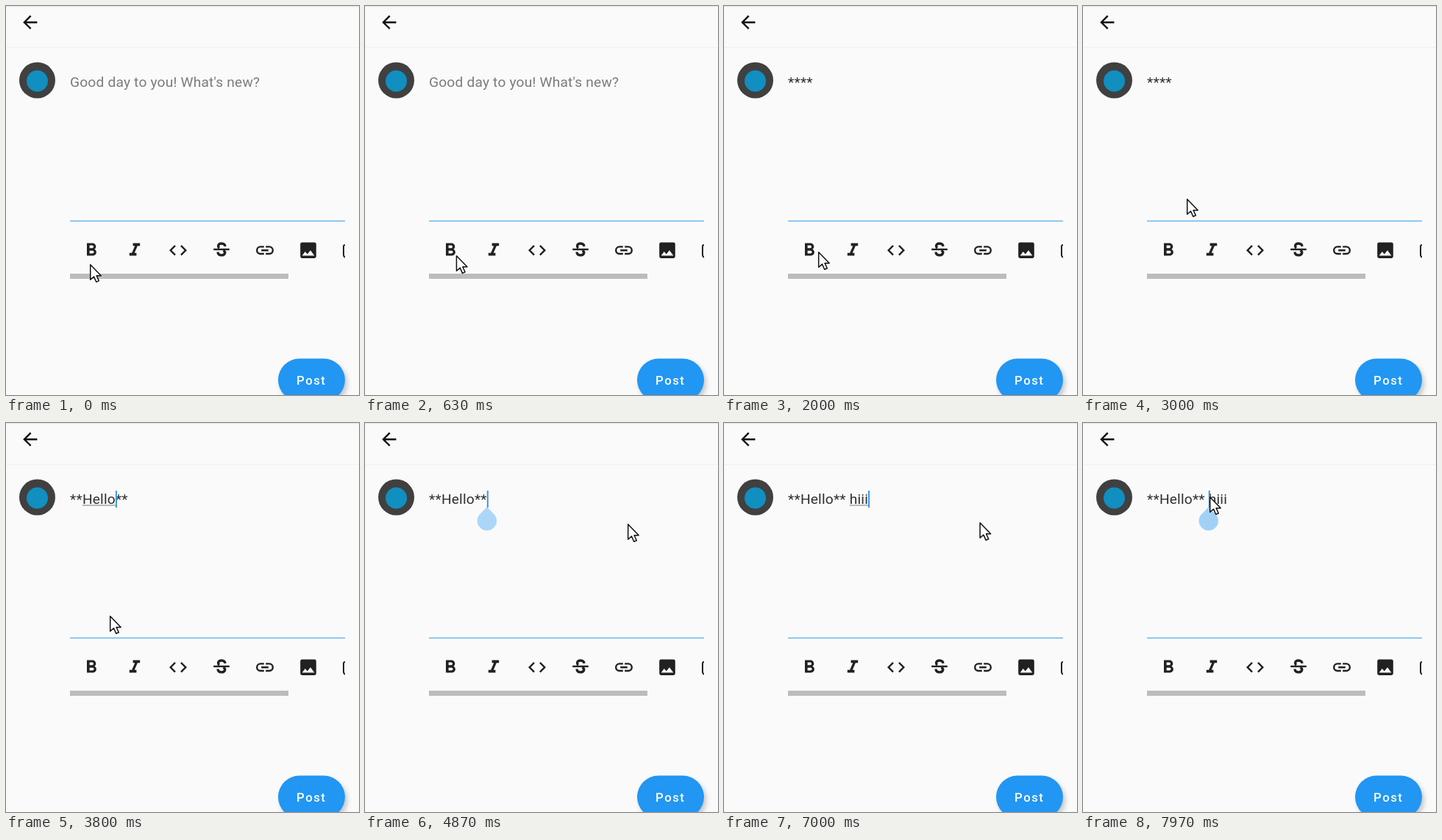
An HTML page that plays this animation: 480x529 px, repeating every 8000 ms.

```html
<!DOCTYPE html>
<html lang="en">
<head>
<meta charset="utf-8">
<title>Post editor</title>
<style>
  html, body { margin: 0; width: 100%; height: 100%; overflow: hidden; background: #fafafa; }
  svg { display: block; width: 100%; height: 100%; }
  text { font-family: Roboto, sans-serif; white-space: pre; }
  .field { font-size: 19.2px; letter-spacing: .18px; }
  .icon { fill: #212121; }
</style>
</head>
<body>
<svg viewBox="0 0 480 529">
  <defs>
    <filter id="blur" x="-30%" y="-30%" width="160%" height="160%"><feGaussianBlur stdDeviation="3"/></filter>
    <clipPath id="bar"><rect x="87" y="280" width="374" height="110"/></clipPath>
  </defs>
  <rect width="480" height="529" fill="#fafafa"/>
  <rect width="480" height="1.2" fill="#e6e6e2"/>
  <rect y="56" width="480" height="1" fill="#f1f1f1"/>

  <path fill="#111" transform="translate(18.4 7.8) scale(1.2)" d="M20 11H7.83l5.59-5.59L12 4l-8 8 8 8 1.41-1.41L7.83 13H20z"/>
  <circle cx="42.5" cy="101" r="24.5" fill="#404040"/>
  <circle cx="42.5" cy="102" r="14.5" fill="#108fc0"/>

  <text id="hint" class="field" x="87" y="109.6" fill="#7c7c7c">Good day to you! What's new?</text>
  <text id="typed" class="field" x="87" y="109.6" fill="#303030"></text>
  <rect id="under" y="111.4" height="1.1" fill="#888"/>
  <rect id="caret" y="92" width="2" height="23" fill="#4097e4"/>
  <path id="handle" d="M0 -18.7L9.33 -9.33A13.2 13.2 0 1 1 -9.33 -9.33Z" fill="#2196f3"/>

  <rect x="87" y="291.7" width="374" height="1.4" fill="#62b3ee"/>
  <g clip-path="url(#bar)">
    <circle id="ripple" cx="116" cy="331.5" fill="#c4c4c4"/>
    <g id="tools"></g>
    <path d="M463 325H461Q459 325 459 327V338Q459 342 463 342" fill="none" stroke="#212121" stroke-width="2"/>
  </g>
  <rect x="87" y="364" width="297" height="7" fill="#bcbcbc"/>

  <rect x="373" y="484" width="91" height="58" rx="29" fill="#777" opacity=".4" filter="url(#blur)"/>
  <rect x="370" y="479.5" width="91" height="58" rx="29" fill="#2196f3"/>
  <text x="395" y="515" font-size="16.8" font-weight="500" letter-spacing="1.5" fill="#fff">Post</text>

  <path id="pointer" d="M0 0V20.5L4.8 16.3L8 23.6L11.6 22L8.4 15H14.5Z" fill="#fff" stroke="#111" stroke-width="1.5" stroke-linejoin="round"/>
</svg>
<script>
const $ = id => document.getElementById(id);
const LOOP = 8000, LEFT = 87, FADE = 200, TAP = 1270;

const tools = [
  '<path d="M15.6 10.79c.97-.67 1.65-1.77 1.65-2.79 0-2.26-1.75-4-4-4H7v14h7.04c2.09 0 3.71-1.7 3.71-3.79 0-1.52-.86-2.82-2.15-3.42zM10 6.5h3a1.5 1.5 0 0 1 0 3h-3zm3.5 9H10v-3h3.5a1.5 1.5 0 0 1 0 3z"/>',
  '<path d="M10 4v3h2.21l-3.42 8H6v3h8v-3h-2.21l3.42-8H18V4z"/>',
  '<path d="M9.4 16.6L4.8 12l4.6-4.6L8 6l-6 6 6 6zM14.6 16.6l4.6-4.6-4.6-4.6L16 6l6 6-6 6z"/>',
  '<path d="M3 10h18v2H3z"/><path d="M16.1 7.5C15.8 3.4 8.3 3.3 8.3 7.1Q8.3 8.5 9.6 9.3M14 12.3C17.7 14 15.6 17.6 12.2 17.6 9.6 17.6 7.9 16.4 7.9 14" fill="none" stroke="#212121" stroke-width="2.8"/>',
  '<path d="M11 8H7a4 4 0 0 0 0 8h4M13 8h4a4 4 0 0 1 0 8h-4M8 12h8" fill="none" stroke="#212121" stroke-width="2"/>',
  '<path d="M21 19V5a2 2 0 0 0-2-2H5a2 2 0 0 0-2 2v14a2 2 0 0 0 2 2h14a2 2 0 0 0 2-2zM8.5 13.5l2.5 3.01L14.5 12l4.5 6H5z"/>'
];
$('tools').innerHTML = tools.map((shape, i) =>
  `<g class="icon" transform="translate(${101.6 + 59 * i} 317.8) scale(1.2)">${shape}</g>`).join('');

// time, text, caret index, start and end of the composing underline
const edits = [
  [0, '', 0],
  [TAP, '****', 2],
  [3270, '**H**', 3, 2, 3],
  [3340, '**He**', 4, 2, 4],
  [3470, '**Hel**', 5, 2, 5],
  [3670, '**Hell**', 6, 2, 6],
  [3800, '**Hello**', 7, 2, 7],
  [4800, '**Hello**', 9],
  [5570, '**Hello** ', 10],
  [6030, '**Hello** h', 11, 10, 11],
  [6070, '**Hello** hi', 12, 10, 12],
  [6130, '**Hello** hii', 13, 10, 13],
  [6270, '**Hello** hiii', 14, 10, 14],
  [7870, '**Hello** hiii', 10]
];
const caretOn = [[30, 530], [1030, 2000], [2500, 3000], [3270, 4300], [4800, 5500], [5570, 7070], [7570, LOOP]];
const handleOn = [[4800, 5570], [7890, LOOP]];

// time, x, y
const path = [
  [0, 114, 351], [370, 123, 340], [530, 123, 340], [1200, 128, 334],
  [2370, 128, 334], [2560, 157, 300], [2730, 141, 262],
  [4270, 141, 262], [4430, 357, 137],
  [6970, 357, 137], [7570, 172, 100], [LOOP, 172, 100]
];

const ramp = (t, a, b) => Math.min(1, Math.max(0, (t - a) / (b - a)));
const within = (t, spans) => spans.find(([a, b]) => t >= a && t < b);
const set = (id, attrs) => { for (const k in attrs) $(id).setAttribute(k, attrs[k]); };

function pointerAt(t) {
  const i = path.findIndex(p => p[0] > t);
  const [a, x0, y0] = path[i - 1], [b, x1, y1] = path[i];
  const k = ramp(t, a, b);
  return [x0 + (x1 - x0) * k + .7, y0 + (y1 - y0) * k + .7];
}

function xAt(index) {
  return LEFT + (index ? $('typed').getSubStringLength(0, index) : 0);
}

function draw(t) {
  const [, text, index, from, to] = edits.filter(e => e[0] <= t).pop();
  if ($('typed').textContent !== text) $('typed').textContent = text;

  const x = xAt(index);
  set('caret', { x, opacity: within(t, caretOn) ? 1 : 0 });
  if (to) set('under', { x: xAt(from), width: xAt(to) - xAt(from), opacity: 1 });
  else set('under', { opacity: 0 });

  const shown = within(t, handleOn);
  set('handle', {
    transform: `translate(${x} 133)`,
    opacity: shown ? ramp(t, shown[0], shown[0] + FADE) : 0
  });

  const fade = 1 - ramp(t, TAP + 30, TAP + 30 + FADE);
  set('hint', { opacity: fade });
  set('ripple', { r: 43 * ramp(t, TAP, TAP + 60), opacity: .6 * fade });
  set('pointer', { transform: `translate(${pointerAt(t).join(' ')})` });
}

const start = performance.now();
function tick() {
  draw((performance.now() - start) % LOOP);
  requestAnimationFrame(tick);
}
tick();
</script>
</body>
</html>
```
